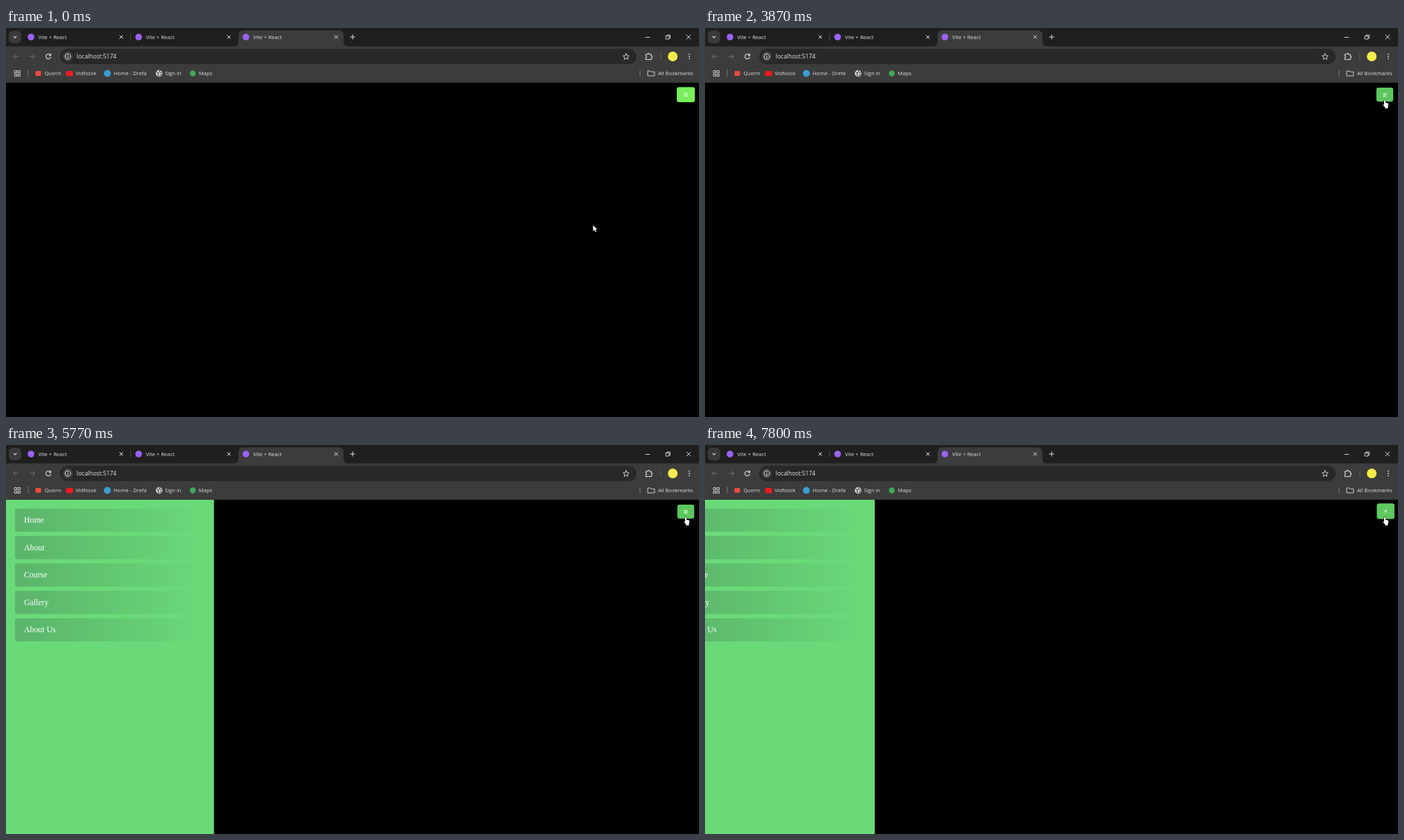
Write an HTML page with a canvas that moves like this. It is 998 by 561 pixels and loops after 8000 ms.

```html
<!DOCTYPE html>
<html lang="en">
<head>
<meta charset="utf-8">
<title>Sidebar menu</title>
<style>
html, body { margin: 0; width: 998px; height: 561px; overflow: hidden; background: #000; }
canvas { display: block; }
</style>
</head>
<body>
<canvas id="stage" width="998" height="561"></canvas>
<script>
const ctx = document.getElementById('stage').getContext('2d');
const LOOP = 8000, LAST_CHANGE = 7800;
const SANS = '"Open Sans", "Noto Sans", sans-serif';
const SERIF = '"Liberation Serif", serif';
const SIDEBAR = 299.5;
const MENU = ['Home', 'About', 'Course', 'Gallery', 'About Us'];

const clamp = v => Math.max(0, Math.min(1, v));
const progress = (t, start, length) => clamp((t - start) / length);
const mix = (a, b, p) => a + (b - a) * p;
const smooth = p => p * p * (3 - 2 * p);

// Damped spring from 0 to 1; s is in seconds.
function spring(s) {
  if (s <= 0) return 0;
  return 1 - Math.exp(-11 * s) * (Math.cos(17 * s) + 11 / 17 * Math.sin(17 * s));
}

function box(x, y, w, h, r, fill) {
  ctx.fillStyle = fill;
  ctx.beginPath();
  ctx.roundRect(x, y, w, h, r);
  ctx.fill();
}

function disc(x, y, r, fill) {
  ctx.fillStyle = fill;
  ctx.beginPath();
  ctx.arc(x, y, r, 0, Math.PI * 2);
  ctx.fill();
}

function stroke(path, color = '#dedede', width = 1) {
  ctx.strokeStyle = color;
  ctx.lineWidth = width;
  ctx.lineCap = ctx.lineJoin = 'round';
  ctx.stroke(new Path2D(path));
}

function at(x, y, draw, scale = 1) {
  ctx.save();
  ctx.translate(x, y);
  ctx.scale(scale, scale);
  draw();
  ctx.restore();
}

function label(text, x, y, size = 7.6, color = '#dedede', family = SANS) {
  ctx.font = `${size}px ${family}`;
  ctx.fillStyle = color;
  ctx.textBaseline = 'alphabetic';
  ctx.fillText(text, x, y);
}

function cross(x, y, r, width = 1) {
  at(x, y, () => stroke(`M${-r} ${-r}L${r} ${r}M${r} ${-r}L${-r} ${r}`, '#e4e4e4', width));
}

function drawTab(x, active) {
  if (active) {
    ctx.fillStyle = '#3c3c3c';
    ctx.fill(new Path2D('M328 27Q335 26 335 19V10.5Q335 3.5 342 3.5H479Q486 3.5 486 10.5V19Q486 26 493 27Z'));
  }
  disc(x + 5, 13, 4.8, '#9b62f5');
  label('Vite + React', x + 15.5, 16);
  cross(x + 135, 13, 2.2);
}

function drawTabStrip() {
  box(0, 0, 998, 26.5, 0, '#1f1f1e');
  box(4, 4, 18, 18, 6, '#3a3a3a');
  stroke('M11 12L13 14.2L15 12', '#e4e4e4', 1.1);
  drawTab(31);
  box(179, 8, 1, 10, 0, '#4a4a48');
  drawTab(186);
  drawTab(340.5, true);
  stroke('M496 13H502.4M499.2 9.8V16.2');
  stroke('M921 13.5H927', '#dedede', .9);
  stroke('M950.5 11.5H955V16H950.5ZM952 11.3V10H956.5V14.5H955.2', '#dedede', .9);
  cross(983, 13, 3, .9);
}

function drawToolbar() {
  box(0, 26, 998, 52, 0, '#3c3c3c');
  box(0, 78, 998, 1, 0, '#353530');
  box(78, 30, 830, 22, 11, '#282827');
  stroke('M18 41H10.5M13.8 37.7L10.5 41L13.8 44.3', '#747474');
  stroke('M34 41H41.5M38.2 37.7L41.5 41L38.2 44.3', '#747474');
  stroke('M64 39.2A3.5 3.5 0 1 0 64.4 42M64.5 37.2V39.7H62', '#dedede', 1.1);
  disc(89, 41, 7.5, '#3c3c3c');
  stroke('M93 41A4 4 0 1 1 85 41A4 4 0 1 1 93 41M89 40.7V43M89 39V39.1');
  label('localhost:5174', 101.8, 44.3, 8.5, '#e6e6e6');
  stroke('M893 36.8L894.3 39.8L897.4 40.1L895 42.2L895.7 45.3L893 43.6L890.3 45.3L891 42.2L888.6 40.1L891.7 39.8Z', '#dedede', .9);
  stroke('M921.5 38H924A1.4 1.4 0 0 1 926.8 38H929.3V40.4A1.4 1.4 0 0 1 929.3 43.2V45.5H921.5V43A1.5 1.5 0 0 0 921.5 40.2Z', '#dedede', 1.1);
  box(942.5, 36, 1, 10, 0, '#5b5b58');
  disc(960.2, 41, 7, '#f8ed4b');
  for (const y of [37.7, 41, 44.3]) disc(984, y, .9, '#dedede');
}

function drawBookmarks() {
  for (const x of [12.5, 17.5]) for (const y of [61.5, 66.5])
    stroke(`M${x} ${y}h3v3h-3Z`, '#dedede', .9);
  box(31.5, 60, 1, 10, 0, '#777773');
  box(42.5, 62, 8, 7, 1, '#e94b3f');
  label('Quorm', 55.5, 68.3, 7.2);
  box(86.5, 62, 10, 7.5, 2, '#f01920');
  label('VidNook', 100.2, 68.3);
  disc(146, 65.5, 5, '#399fd2');
  label('Home - Drefa', 155, 68.3);
  disc(220.5, 65.5, 4.7, '#dedede');
  stroke('M217.4 63.5L220 65.2L218.7 67L220 69M221.5 61.5L221 63.5L223.8 64.5M222 68.4L223.8 66.4', '#3c3c3c', 1.2);
  label('Sign in', 229, 68.3);
  disc(269, 65.5, 4.2, '#42a85b');
  label('Maps', 277.8, 68.3);
  box(912.5, 61, 1, 9, 0, '#777773');
  stroke('M924.5 62H928L929.3 63.3H934V69H924.5Z', '#dedede', .9);
  label('All Bookmarks', 939, 68.3);
}

function sidebarOpen(t) {
  if (t < 5000) return smooth(progress(t, 4226, 250));
  if (t < 7000) return 1 - smooth(progress(t, 5775, 230));
  return smooth(progress(t, 7553, 340));
}

function drawSidebar(t) {
  const open = sidebarOpen(t);
  if (!open) return;
  at((open - 1) * SIDEBAR, 0, () => {
    box(0, 79, SIDEBAR, 482, 0, '#6ada78');
    const shade = ctx.createLinearGradient(13, 0, 287, 0);
    shade.addColorStop(0, 'rgba(70, 130, 90, .43)');
    shade.addColorStop(1, 'rgba(70, 130, 90, 0)');
    MENU.forEach((name, i) => {
      const y = 91.7 + i * 39.55;
      box(13, y, 273.5, 33.4, 3, shade);
      label(name, 26, y + 20.3, 11.8, '#fff', SERIF);
    });
  });
}

const HOVER = 1.09, PRESSED = .93;

function buttonState(t) {
  const press = start => mix(HOVER, PRESSED, spring((t - start) / 1000));
  const release = (start, length) => mix(PRESSED, HOVER, smooth(progress(t, start, length)));
  if (t < 3170) return [mix(1, HOVER, spring((t - 2600) / 1000)), false];
  if (t < 4200) return [press(3170), false];
  if (t < 5400) return [release(4200, 90), true];
  if (t < 5760) return [press(5400), true];
  if (t < 6440) return [release(5760, 230), false];
  if (t < 7510) return [press(6440), false];
  return [release(7510, 80), true];
}

function drawButton(t) {
  const [scale, close] = buttonState(t);
  const hover = progress(t, 2600, 250);
  const color = `rgb(${mix(121, 94, hover)}, ${mix(238, 200, hover)}, ${mix(91, 96, hover)})`;
  at(close ? 980.2 : 979, close ? 95.5 : 96.1, () => {
    if (close) {
      box(-11.7, -10.4, 23.4, 20.8, 3, color);
      cross(0, 0, 1.2, 1.1);
    } else {
      box(-13, -10.8, 26, 21.6, 3, color);
      for (const y of [-1.8, .3, 2.4]) box(-2.7, y - .45, 5.4, .95, 0, '#f2fff0');
    }
  }, scale);
}

function drawPointer(path, outline) {
  stroke(path, '#111', outline);
  ctx.fillStyle = '#fff';
  ctx.fill(new Path2D(path));
}

function drawCursor(t) {
  if (t >= 2650) {
    const hand = 'M1.6 1.2Q2.6 .2 3.4 1.2V4.8L6.6 5.3Q7.7 5.7 7.5 7L6.8 10V12H2.8V10.7L.2 7.8Q-.3 6.6 1.6 7.2Z';
    at(976.3, t < 3000 ? 104 : 103, () => drawPointer(hand, 1), 1.06);
    return;
  }
  const drift = smooth(progress(t, 460, 340));
  const approach = progress(t, 1970, 30), arrive = progress(t, 2270, 30), settle = progress(t, 2600, 50);
  let x = mix(845.5, 844, drift), y = mix(284.5, 282.5, drift);
  x = mix(mix(mix(x, 935, approach), 962, arrive), 978, settle);
  y = mix(mix(mix(y, 115, approach), 105, arrive), 104, settle);
  at(x, y, () => drawPointer('M0 0V8.3L1.9 6.6L3.3 9.6L4.7 8.9L3.4 6H5.8Z', 1));
}

function render(now) {
  const t = Math.min(now % LOOP, LAST_CHANGE);
  box(0, 0, 998, 561, 0, '#000');
  drawToolbar();
  drawTabStrip();
  drawBookmarks();
  drawSidebar(t);
  drawButton(t);
  drawCursor(t);
}

const start = performance.now();
function tick() {
  render(performance.now() - start);
  requestAnimationFrame(tick);
}
tick();
</script>
</body>
</html>
```
